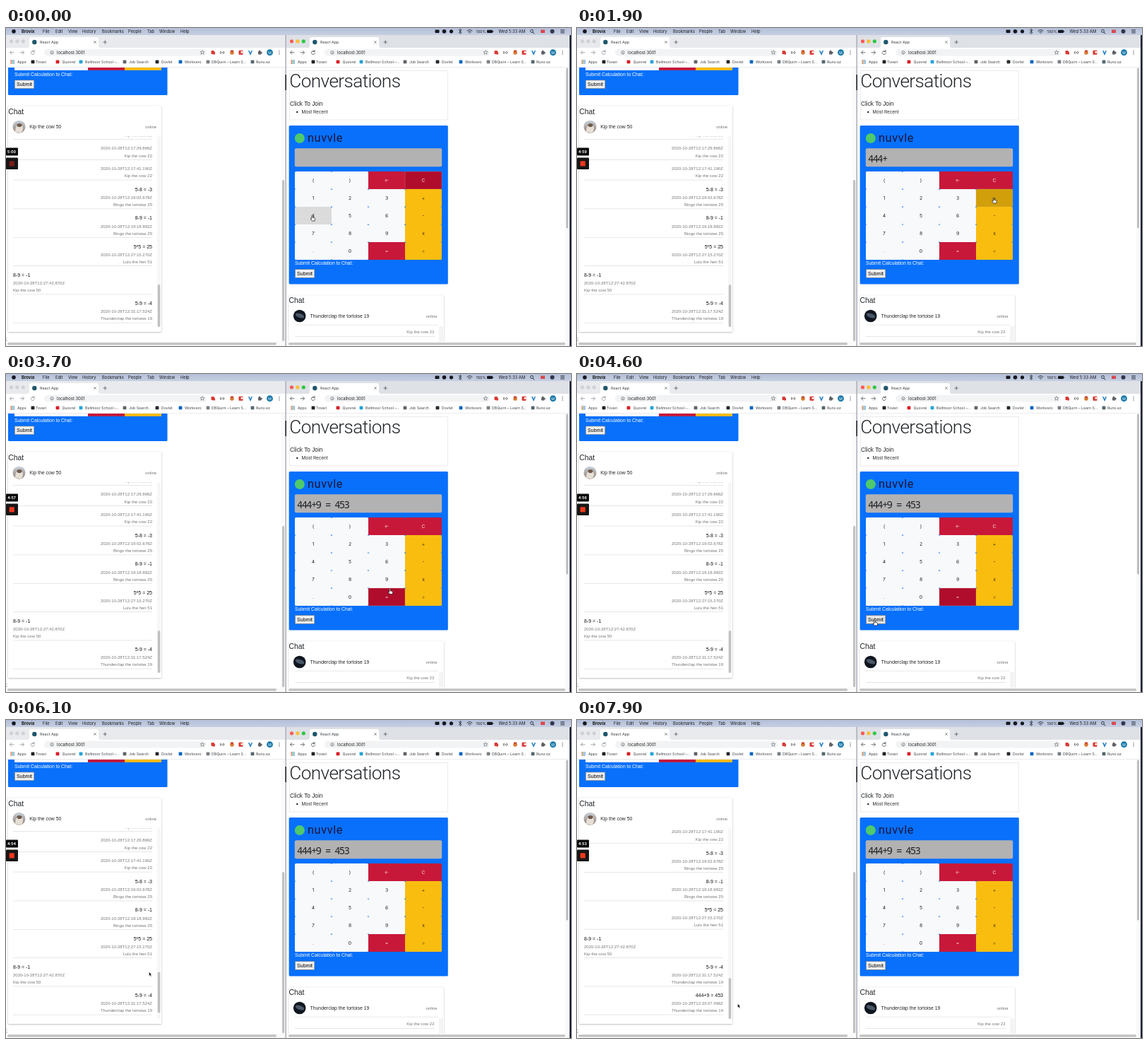
An HTML page for the animation above (8000 ms loop, 800 px wide and 450 px high).

```html
<!DOCTYPE html>
<html lang="en">
<head>
<meta charset="utf-8">
<style>
html, body { margin: 0; width: 100%; height: 100%; overflow: hidden; background: #fff; }
svg { display: block; width: 800px; height: 450px; }
text { font-family: "Liberation Sans", Arial, sans-serif; white-space: pre; }
.ui { font-family: Inter, Roboto, sans-serif; }
.thin { font-family: Roboto, sans-serif; font-weight: 300; }
.brand { font-family: Roboto, sans-serif; letter-spacing: .6px; }
.lcd { font-family: "Noto Sans Mono", monospace; font-weight: 500; letter-spacing: -1.75px; }
</style>
</head>
<body>
<svg id="stage" viewBox="0 0 800 450"></svg>
<script>
const LOOP = 8000;
const BLUE = '#0870fb', GREY = '#757575', THUMB = '#c1c1c1';

const rect = (x, y, w, h, fill, extra = '') =>
  `<rect x="${x}" y="${y}" width="${w}" height="${h}" fill="${fill}" ${extra}/>`;
const dot = (x, y, r, fill, extra = '') => `<circle cx="${x}" cy="${y}" r="${r}" fill="${fill}" ${extra}/>`;
const line = (d, color = '#5f6368', width = 0.9) =>
  `<path d="${d}" fill="none" stroke="${color}" stroke-width="${width}" stroke-linecap="round"/>`;
const text = (x, y, s, size, fill = '#212529', extra = '') =>
  `<text x="${x}" y="${y}" font-size="${size}" fill="${fill}" ${extra}>${s}</text>`;
const ui = (x, y, s, size, fill, extra = '') => text(x, y, s, size, fill, 'class="ui" ' + extra);
const END = 'text-anchor="end"', MID = 'text-anchor="middle"';

// ---- Menu bar ----
function menuBar() {
  const menus = [[52, 'File'], [70, 'Edit'], [88, 'View'], [108, 'History'], [136, 'Bookmarks'],
    [173, 'People'], [200, 'Tab'], [217, 'Window'], [247, 'Help']];
  return rect(0, 0, 800, 10, 'url(#bar)') + dot(11, 4.8, 2.8, '#151820') +
    ui(22, 7, 'Brovix', 6, '#111', 'font-weight="700"') +
    menus.map(([x, s]) => ui(x, 7, s, 5.8, '#181a20')).join('') +
    rect(607.5, 2.5, 6, 4.5, '#151820', 'rx="1"') +
    dot(620.5, 4.8, 2.8, '#151820') + dot(630.5, 4.8, 2.6, '#151820') +
    line('M641 2.5l4 4-2 1.8v-7l2 1.7-4 4', '#151820', 0.7) +
    line('M653 4q3.5-3 7 0M654.6 5.7q1.9-1.6 3.8 0M656.5 7.3v.1', '#151820') +
    ui(665.5, 7, '100%', 5.4, '#181a20') +
    rect(681, 2.7, 8, 4.4, '#151820', 'rx="1"') + rect(689.4, 4, 0.8, 1.8, '#151820') +
    ui(697.5, 7, 'Wed 5:33 AM', 5.9, '#181a20') +
    dot(744.5, 4.3, 2, 'none', 'stroke="#151820" stroke-width=".8"') + line('M746 6l2 2', '#151820') +
    rect(757, 2.5, 6, 4.5, '#d84a50') + dot(773.5, 4.8, 3, '#33364c') +
    line('M785.5 2.7h5M785.5 4.8h5M785.5 6.9h5', '#151820', 0.8);
}

// ---- Browser frame: o moves tabs and bookmarks, end moves the right-hand tools ----
function browser(o, end, active) {
  const lights = active ? ['#fc5b57', '#fdbd2e', '#28c840'] : ['#cfd1d4', '#cfd1d4', '#cfd1d4'];
  const marks = [[38, 42, 'Tovari', '#222'], [73, 79.5, 'Quovrel', '#d81f26'],
    [106, 112, 'Bellmoor School –…', '#24a3d8'], [168, 174, 'Job Search', '#5f6368'],
    [214, 220, 'Dovlet', '#24292e'], [247, 253, 'Workvero', '#0a66c2'],
    [286, 291, 'DBQuirn – Learn S…', '#7a7f86'], [349, 354, 'Runo.ez', '#56676e']];
  const strip = active ? '#dee1e6' : '#e8eaed';
  const arrow = active ? '#5f6368' : '#9a9ea4';
  let s = rect(o, 10, 396 + (active ? 5 : 0), 18, strip) +
    lights.map((c, i) => dot(o + 7.5 + i * 8.4, 18.8, 2.6, c)).join('') +
    `<path d="M${o + 30} 28q3 0 3-3v-9q0-3 3-3h92q3 0 3 3v9q0 3 3 3z" fill="#fff"/>` +
    dot(o + 40.3, 20, 3.2, '#20566b') + ui(o + 48, 22, 'React App', 5.4, '#3c4043') +
    line(`M${o + 124.6} 18.6l2.8 2.8m0-2.8l-2.8 2.8`, '#5f6368', 0.7) +
    line(`M${o + 138} 20h4.4m-2.2-2.2v4.4`) +
    rect(o, 28, 404, 28, '#fff') +
    line(`M${o + 11} 34.7h-5.5m2.4-2.4l-2.4 2.4 2.4 2.4`, arrow) +
    line(`M${o + 20} 34.7h5.5m-2.4-2.4l2.4 2.4-2.4 2.4`, arrow) +
    line(`M${o + 40} 33.3a2.6 2.6 0 1 0 .5 2m-.4-4v2.2h-2.2`, arrow) +
    rect(o + 54, 29.8, 230 + end - o, 9.8, '#f1f3f4', 'rx="4.9"') +
    dot(o + 65, 34.7, 2.2, 'none', 'stroke="#5f6368" stroke-width=".7"') + line(`M${o + 65} 34.5v1.2`, '#5f6368', 0.7) +
    ui(o + 72, 36.8, 'localhost:3001', 5.8, '#202124');
  const e = end;
  s += `<path d="M${e + 278} 31.6l.9 2h2.1l-1.7 1.4.7 2.2-2-1.3-2 1.3.7-2.2-1.7-1.4h2.1z" fill="none" stroke="#5f6368" stroke-width=".6"/>` +
    rect(e + 290.5, 32, 4.5, 5, '#d93a35', 'rx="1"') + rect(e + 293, 34, 3, 3.4, '#d93a35') +
    line(`M${e + 304} 33q-1.5 1.7 0 3.4m4-3.4q1.5 1.7 0 3.4`, '#333') + dot(e + 306, 34.7, 0.8, '#333') +
    dot(e + 320, 35, 2.8, '#d77a35') + rect(e + 318, 31.5, 4, 2, '#c6382c') +
    rect(e + 329.5, 31.8, 6, 6, '#d8352e', 'rx="1"') + rect(e + 332.5, 33, 3, 2.5, '#fff') +
    line(`M${e + 344} 32.6l2 4.5 2-4.5`, '#2a83c9', 1.6) +
    rect(e + 357, 33, 4.6, 4.4, '#5f6368', 'rx=".8"') + dot(e + 359, 32.8, 1.2, '#5f6368') + dot(e + 361.8, 35, 1.1, '#5f6368') +
    dot(e + 373.5, 34.7, 4.4, '#1677a8') + ui(e + 373.5, 36.5, 'M', 5, '#fff', MID) +
    [32.4, 34.7, 37].map(y => dot(e + 387, y, 0.7, '#5f6368')).join('');
  for (let i = 0; i < 9; i++)
    s += rect(o + 6.5 + i % 3 * 2, 45.2 + Math.floor(i / 3) * 2, 1.4, 1.4, ['#ea4335', '#34a853', '#4285f4'][i % 3]);
  s += ui(o + 16, 50, 'Apps', 5.2, '#3c4043');
  for (const [ix, tx, label, color] of marks)
    s += rect(o + ix - 2.4, 45.4, 4.8, 4.8, color, 'rx=".6"') + ui(o + tx, 50, label, 5.2, '#3c4043');
  return s + rect(o, 55, 404, 0.7, '#e2e4e7');
}

// ---- Page parts ----
const submitBox = (x, y, id) =>
  text(x, y, 'Submit Calculation to Chat:', 6.8, '#fff') +
  rect(x + 0.3, y + 6.4, 27.5, 11.8, '#efefef', `id="${id}" stroke="#767676" stroke-width=".6"`) +
  text(x + 14, y + 14.9, 'Submit', 7, '#000', MID);

const card = (x, y, w, h) => rect(x, y, w, h, '#fff', 'filter="url(#shadow)"');

const chatHead = (x, y, name, avatar) =>
  text(x, y, 'Chat', 10.4) + avatar +
  text(x + 30, y + 20.6, name, 6.9) + text(x + 210, y + 20.6, 'online', 6, GREY, END);

function messages() {
  const other = 'Bingo the tortoise 25', me = 'Kip the cow 22', top = 'Thunderclap the tortoise 19';
  const rows = [[231, '5-8 = -3', '19:02.678', other], [271.3, '8-9 = -1', '19:18.982', other],
    [311.5, '5*5 = 25', '27:15.270', 'Lulu the hen 51'], [352, '8-9 = -1', '27:42.870', 'Kip the cow 50', true],
    [392.2, '5-9 = -4', '31:17.524', top], [432.4, '444+9 = 453', '33:07.486', top]];
  const stamp = s => `2020-10-28T12:${s}Z`;
  const rule = y => rect(10, y, 197, 0.7, '#dcdcdc');
  const right = (y, s) => text(207, y, s, 6, GREY, END);
  let s = right(153.6, me) + rule(157) +
    right(172.3, stamp('17:29.866')) + right(182.5, me) + rule(186.2) +
    right(200.8, stamp('17:41.190')) + right(211, me) + rule(214.7);
  rows.forEach(([y, sum, time, who, own], i) => {
    const x = own ? 10 : 207, a = own ? '' : END;
    s += `<g ${i == 5 ? 'id="fresh"' : ''}>` + text(x, y, sum, 7, '#111', a) +
      text(x, y + 11.2, stamp(time), 6, GREY, a) + text(x, y + 21.2, who, 6, GREY, a) + rule(y + 24.6) + '</g>';
  });
  return s;
}

// Fill at rest, under the pointer and focused, then label colour
const LOOK = {
  light: ['#f8f9fa', '#dfe3e8', '#dbdbdb', '#212529'],
  red: ['#c8183a', '#bd1434', '#b00d2c', '#f5d5da'],
  gold: ['#f9bd10', '#e6ab0c', '#d19f0a', '#3a3010']
};
const keys = [...'()←C123+456-789x.0=÷'].map((label, i) => {
  const col = i % 4, row = Math.floor(i / 4);
  const kind = '←C='.includes(label) ? 'red' : col == 3 ? 'gold' : 'light';
  return { label, x: 409 + col * 52, y: 203 + row * 25, look: LOOK[kind], kind };
});

function calculator() {
  return rect(400.6, 138.1, 225.2, 224.3, BLUE, 'rx="1.5"') + dot(415.8, 156, 7, '#4fc96b') +
    text(427, 160.8, 'nuvvle', 16.3, '#1b1438', 'class="brand"') +
    rect(408.8, 170.2, 208.4, 26.1, '#b3b2b3', 'rx="2"') +
    '<text id="display" class="lcd" x="412" y="190.2" font-size="14" fill="#222"></text>' +
    keys.map((k, i) => rect(k.x, k.y, 52, 25, k.look[0], `id="k${i}" rx="1.6" stroke-width=".5" stroke-dasharray="1 1"`) +
      ui(k.x + 26, k.y + 15, k.label, 6.8, k.look[3], MID)).join('') +
    submitBox(409, 335.2, 'submit');
}

const dogAvatar = dot(18.5, 139.7, 9, 'url(#dog)') +
  '<path d="M13 147q0-9 5-10 6 0 6 5 0 5-4 6.5z" fill="#e6dfd6"/><path d="M15 137q4-4 8 0l-2 3h-4z" fill="#705b4c"/>';
const spaceAvatar = dot(415.7, 407.5, 8.8, '#10161f') +
  '<ellipse cx="416" cy="407" rx="6.5" ry="3" fill="#6f8498" opacity=".6" transform="rotate(20 416 407)"/>';

stage.innerHTML = `<defs>
  <linearGradient id="bar" x2="0" y2="1"><stop stop-color="#b4bfd8"/><stop offset="1" stop-color="#c6cfe2"/></linearGradient>
  <linearGradient id="dog" x2="0" y2="1"><stop stop-color="#c9d2dc"/><stop offset="1" stop-color="#927f72"/></linearGradient>
  <filter id="shadow" x="-5%" y="-5%" width="110%" height="112%"><feDropShadow dx="0" dy=".7" stdDeviation=".9" flood-opacity=".3"/></filter>
  <clipPath id="list"><rect x="3" y="153.6" width="211" height="269.4"/></clipPath>
  <clipPath id="page"><rect x="397" y="56" width="402" height="388"/></clipPath></defs>` +
  rect(0, 0, 800, 450, '#fff') +
  browser(0, 0, false) +
  `<path d="M3 56h225.500v37.500q0 1.500-1.500 1.500h-222.500q-1.500 0-1.500-1.500z" fill="${BLUE}"/>` +
  rect(12, 56, 104, 3.8, '#f8f9fa') + rect(116, 56, 52, 3.8, '#c8183a') + rect(168, 56, 52, 3.8, '#f9bd10') +
  submitBox(12, 67.5, 'idle') +
  card(3, 110.5, 217, 319.5) + chatHead(3.2, 121.5, 'Kip the cow 50', dogAvatar) +
  `<g clip-path="url(#list)"><g id="log">${messages()}</g></g>` +
  rect(213.7, 153.6, 5.5, 269.4, '#f7f7f7') + rect(214.8, 363, 3.4, 60, THUMB, 'id="logThumb" rx="1.7"') +
  text(0, 442, ';', 7) +
  rect(389.5, 56, 6, 394, '#fafafa') + rect(391, 215, 3.2, 228, THUMB, 'rx="1.6"') +
  rect(0, 443.8, 396, 6.2, '#fafafa') + rect(2, 445.3, 381, 3.2, THUMB, 'rx="1.6"') +
  rect(395.4, 10, 1.6, 440, '#aeb2b9') + rect(395.4, 66, 1.6, 22, '#25272c') +
  browser(397, 401, true) +
  `<g clip-path="url(#page)">` +
  rect(401.3, 60.3, 224.4, 69.7, '#fff', 'stroke="#dedede" stroke-width=".6"') +
  text(401.3, 84.3, 'Conversations', 26.2, '#212529', 'class="thin" letter-spacing="-.6"') +
  text(402, 109.5, 'Click To Join', 8.3) + dot(412.3, 119, 1.2, '#212529') + ui(418.5, 121.2, 'Most Recent', 6.3, '#212529') +
  calculator() +
  card(400.3, 378.5, 219.5, 90) + chatHead(400.5, 389.3, 'Thunderclap the tortoise 19', spaceAvatar) +
  rect(409, 419.8, 203, 0.7, '#e0e0e0') + text(606.5, 431.7, 'Kip the cow 22', 6, GREY, END) +
  rect(409, 436.2, 198, 0.7, '#dcdcdc') + rect(613, 422, 6, 30, '#f4f4f4') + '</g>' +
  rect(791.5, 56, 6.5, 394, '#fafafa') + rect(793, 56.5, 3.2, 227, THUMB, 'rx="1.6"') +
  rect(397, 443.8, 401, 6.2, '#fafafa') + rect(400, 445.3, 392, 3.2, THUMB, 'rx="1.6"') +
  rect(798, 10, 2, 440, '#1a2036') +
  menuBar() +
  rect(0, 169.5, 17, 11, '#0b0b0b', 'rx="1"') +
  `<text id="clock" class="ui" x="8" y="177" font-size="5.2" font-weight="700" fill="#fff" ${MID}></text>` +
  rect(0, 183.5, 17, 16.5, '#161616', 'rx="1"') + rect(4.6, 188.3, 7.2, 7.2, '#f0381c', 'id="stop" rx=".6"') +
  `<g id="cursor" stroke="#111" stroke-width=".7" stroke-linejoin="round">
    <path id="hand" fill="#fff" d="M-.7 .6q.7-1 1.400 0v2.700l2.600.6q1 .3.9 1.300l-.6 2.800h-3.800l-2.300-3q.3-1 1.800.1z"/>
    <path id="arrow" fill="#111" stroke="#fff" stroke-width=".4" d="M0 0v5.600l1.300-1.200 1 2.100 1-.4-1-2.100h1.700z"/></g>`;

// ---- Timeline ----
const $ = id => document.getElementById(id);
const path = [[0, 433.5, 265], [850, 433.5, 265], [1200, 557, 262], [1500, 590, 240], [1900, 590, 240],
  [2450, 548.5, 289], [2800, 548.5, 289], [3200, 543.5, 303.5], [3800, 543.5, 303.5], [4450, 421.5, 348],
  [5000, 421.5, 348], [5900, 202.5, 356.5], [7000, 202.5, 356.5], [7600, 227.5, 401.5], [LOOP, 227.5, 401.5]];
const typed = [[0, ''], [200, '4'], [450, '44'], [700, '444'], [1700, '444+'], [2700, '444+9'], [3300, '444+9 = 453']];
const focus = [[0, 'C'], [100, '4'], [1700, '+'], [2700, '9'], [3300, '='], [4700, '']];

const latest = (steps, t) => steps.findLast(s => t >= s[0])[1];
const ease = p => { p = Math.min(1, Math.max(0, p)); return p * p * (3 - 2 * p); };

function cursorAt(t) {
  const i = path.findIndex(p => t < p[0]);
  const [t0, x0, y0] = path[i - 1], [t1, x1, y1] = path[i], p = ease((t - t0) / (t1 - t0));
  return [x0 + (x1 - x0) * p, y0 + (y1 - y0) * p];
}
const inside = (x, y, bx, by, w, h) => x >= bx && x < bx + w && y >= by && y < by + h;

function draw(t) {
  const [x, y] = cursorAt(t), focused = latest(focus, t);
  let over = inside(x, y, 409, 341.5, 28, 12);
  $('submit').setAttribute('fill', over ? '#e4e4e4' : '#efefef');
  keys.forEach((k, i) => {
    const hover = inside(x, y, k.x, k.y, 52, 25), on = k.label == focused || (hover && t < 100);
    over ||= hover;
    const el = $('k' + i);
    el.setAttribute('fill', k.look[on ? 2 : hover ? 1 : 0]);
    el.setAttribute('stroke', on && k.kind != 'light' ? '#d8a994' : 'none');
  });
  $('display').textContent = latest(typed, t);

  const left = 300 - Math.floor(t / 1000);
  $('clock').textContent = Math.floor(left / 60) + ':' + String(left % 60).padStart(2, '0');
  $('stop').setAttribute('fill', t < 500 ? '#7a1d18' : '#f0381c');

  const arrived = t >= 4900, scroll = ease((t - 6400) / 700);
  $('fresh').setAttribute('visibility', arrived ? 'visible' : 'hidden');
  $('log').setAttribute('transform', `translate(0 ${-40.3 * scroll})`);
  $('logThumb').setAttribute('y', arrived ? 356.5 + 8.5 * scroll : 363);
  $('logThumb').setAttribute('height', arrived ? 58 : 60);

  $('cursor').setAttribute('transform', `translate(${x} ${y})`);
  $('hand').setAttribute('visibility', over ? 'visible' : 'hidden');
  $('arrow').setAttribute('visibility', over ? 'hidden' : 'visible');
}

const start = performance.now();
function tick() {
  draw((performance.now() - start) % LOOP);
  requestAnimationFrame(tick);
}
tick();
</script>
</body>
</html>
```
